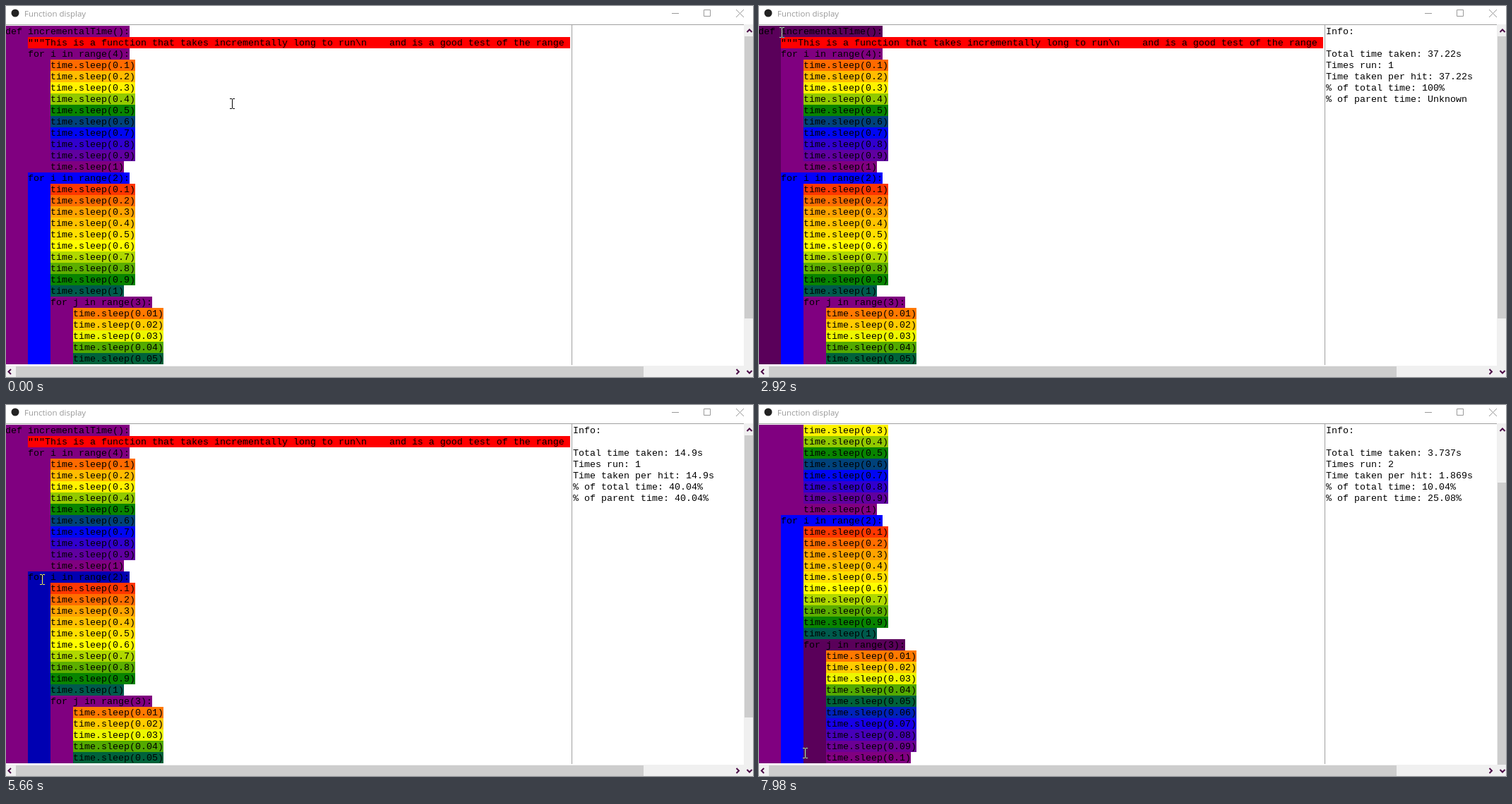
Write an HTML page with a canvas that moves like this. It is 1058x526 px and loops after 8 s.

```html
<!DOCTYPE html>
<html lang="en">
<head>
<meta charset="utf-8">
<title>Function display</title>
<style>
html, body { margin: 0; width: 100%; height: 100%; overflow: hidden; background: #fff; }
canvas { display: block; }
</style>
</head>
<body>
<canvas id="stage" width="1058" height="526"></canvas>
<script>
const ctx = document.getElementById('stage').getContext('2d');
const LOOP = 8000, STEP = 68.2, ROW = 16, CHAR = 8, TOP = 28, BOTTOM = 508;
const MONO = '13.333px "Liberation Mono", monospace';
const PURPLE = '#800080', GREY = '#a0a0a0', TRACK = '#f0f0f0', THUMB = '#cdcdcd';

// Rainbow from red (0) through orange, yellow, green and blue to purple (5)
const rainbow = [[255, 0, 0], [255, 165, 0], [255, 255, 0], [0, 128, 0], [0, 0, 255], [128, 0, 128]];
function heat(level) {
  const i = Math.min(Math.floor(level), 4);
  const mix = rainbow[i].map((c, n) => Math.round(c + (rainbow[i + 1][n] - c) * (level - i)));
  return `rgb(${mix})`;
}

// Ten sleeps of growing length; the heat rises to peak along an ease-out curve
const sleeps = (col, unit, peak, power) => Array.from({ length: 10 }, (_, i) => ({
  text: `time.sleep(${+((i + 1) * unit).toFixed(2)})`, col, span: 1,
  color: heat(peak * (1 - (0.9 - i / 10 + 1e-9) ** power))
}));

const block = (text, col, span, color, total, runs, perHit, ofTotal, ofParent) => ({
  text, col, span, color,
  info: ['Info:', '', `Total time taken: ${total}`, `Times run: ${runs}`, `Time taken per hit: ${perHit}`,
    `% of total time: ${ofTotal}`, `% of parent time: ${ofParent}`]
});

const docstring = '"""This is a function that takes incrementally long to run\\n' +
  '    and is a good test of the range ';
const code = [
  block('def incrementalTime():', 0, 35, PURPLE, '37.22s', 1, '37.22s', '100%', 'Unknown'),
  block(docstring, 4, 1, '#f00', '0.1748µs', 1, '0.1748µs', '4.696e-07%', '4.696e-07%'),
  block('for i in range(4):', 4, 11, PURPLE, '22.32s', 1, '22.32s', '59.96%', '59.96%'),
  ...sleeps(8, 0.1, 5, 1.3),
  block('for i in range(2):', 4, 22, '#00f', '14.9s', 1, '14.9s', '40.04%', '40.04%'),
  ...sleeps(8, 0.1, 3.3, 1),
  block('for j in range(3):', 8, 11, PURPLE, '3.737s', 2, '1.869s', '10.04%', '25.08%'),
  ...sleeps(12, 0.01, 5, 1.5)
].map((line, row) => ({ ...line, row, x: line.col * CHAR - 1, width: line.text.length * CHAR }));

const path = [
  { t: 0, x: 320, y: 138 }, { t: 1010, x: 238, y: 56 }, { t: 2920, x: 32, y: 37 },
  { t: 3320, x: 10, y: 60 }, { t: 4140, x: 35, y: 127 }, { t: 5660, x: 51, y: 248 },
  { t: 6470, x: 47, y: 328 }, { t: 7980, x: 65, y: 494 }
];

function pointerAt(t) {
  const next = Math.max(1, path.findIndex(p => p.t >= t));
  const a = path[next - 1], b = path[next];
  const u = Math.max(0, (t - a.t) / (b.t - a.t));
  return { x: Math.round(a.x + (b.x - a.x) * u), y: Math.round(a.y + (b.y - a.y) * u) };
}

function lineUnder({ x, y }, scroll) {
  const row = Math.floor((y - TOP + scroll) / ROW);
  return code.findLast(line => {
    const inRows = row >= line.row && row < line.row + line.span;
    const width = row === line.row ? line.width : 4 * CHAR;
    return inRows && x >= line.x && x < line.x + width;
  });
}

function rect(x, y, w, h, color) {
  ctx.fillStyle = color;
  ctx.fillRect(x, y, w, h);
}

function text(str, x, y, font = MONO, color = '#000') {
  ctx.font = font;
  ctx.fillStyle = color;
  ctx.fillText(str, x, y);
}

function stroke(shape, color, width) {
  ctx.strokeStyle = color;
  ctx.lineWidth = width;
  ctx.stroke(new Path2D(shape));
}

function drawTitleBar() {
  ctx.fillStyle = '#222';
  ctx.beginPath();
  ctx.arc(13, 10, 5.5, 0, 7);
  ctx.fill();
  text('Function display', 26, 15, '11.5px "Open Sans", sans-serif', '#999');
  stroke('M943 10.5h10 M988.5 5.5h9v9h-9z M1034 5l11 11 M1045 5l-11 11', '#999', 1);
}

function drawCode(hovered, scroll) {
  ctx.save();
  ctx.beginPath();
  ctx.rect(0, TOP, 799, BOTTOM - TOP);
  ctx.clip();
  ctx.translate(0, TOP - scroll);
  for (const line of code) {
    const y = line.row * ROW;
    const fill = color => {
      rect(line.x, y, line.width, ROW, color);
      rect(line.x, y + ROW, 4 * CHAR, (line.span - 1) * ROW, color);
    };
    fill(line.color);
    if (line === hovered) fill('rgba(0,0,0,.3)');
    text(line.text, line.x, y + 12);
  }
  ctx.restore();
}

function drawFrame(scroll) {
  rect(0, 26, 1045, 1, GREY);
  rect(801, 27, 1, 482, GREY);
  rect(1045, 26, 13, 500, TRACK);
  rect(0, 510, 1058, 16, TRACK);
  rect(1046, 43 + Math.round(scroll * 0.835), 12, 400, THUMB);
  rect(14, 511, 889, 15, THUMB);
  stroke('M1049.5 37l3.5-3.5 3.5 3.5 M1049.5 517l3.5 3.5 3.5-3.5' +
    'M7 515l-3.5 3.5 3.5 3.5 M1034.5 515l3.5 3.5-3.5 3.5', '#4b0a46', 2);
}

// I-beam that inverts what lies beneath
function drawPointer({ x, y }) {
  ctx.globalCompositeOperation = 'difference';
  rect(x, y - 6, 1, 13, '#fff');
  for (const edge of [y - 7, y + 7]) {
    rect(x - 3, edge, 3, 1, '#fff');
    rect(x + 1, edge, 3, 1, '#fff');
  }
  ctx.globalCompositeOperation = 'source-over';
}

function draw(now) {
  const t = Math.floor((now % LOOP + 24) / STEP) * STEP - 10;
  const scroll = t < 6200 ? 0 : t < 6900 ? 40 : 80;
  const pointer = pointerAt(t);
  const hovered = lineUnder(pointer, scroll);
  rect(0, 0, 1058, 526, '#fff');
  drawTitleBar();
  drawCode(hovered, scroll);
  hovered?.info?.forEach((str, i) => text(str, 803, TOP + i * ROW + 12));
  drawFrame(scroll);
  drawPointer(pointer);
}

const start = performance.now();
function tick() {
  draw(performance.now() - start);
  requestAnimationFrame(tick);
}
tick();
</script>
</body>
</html>
```
